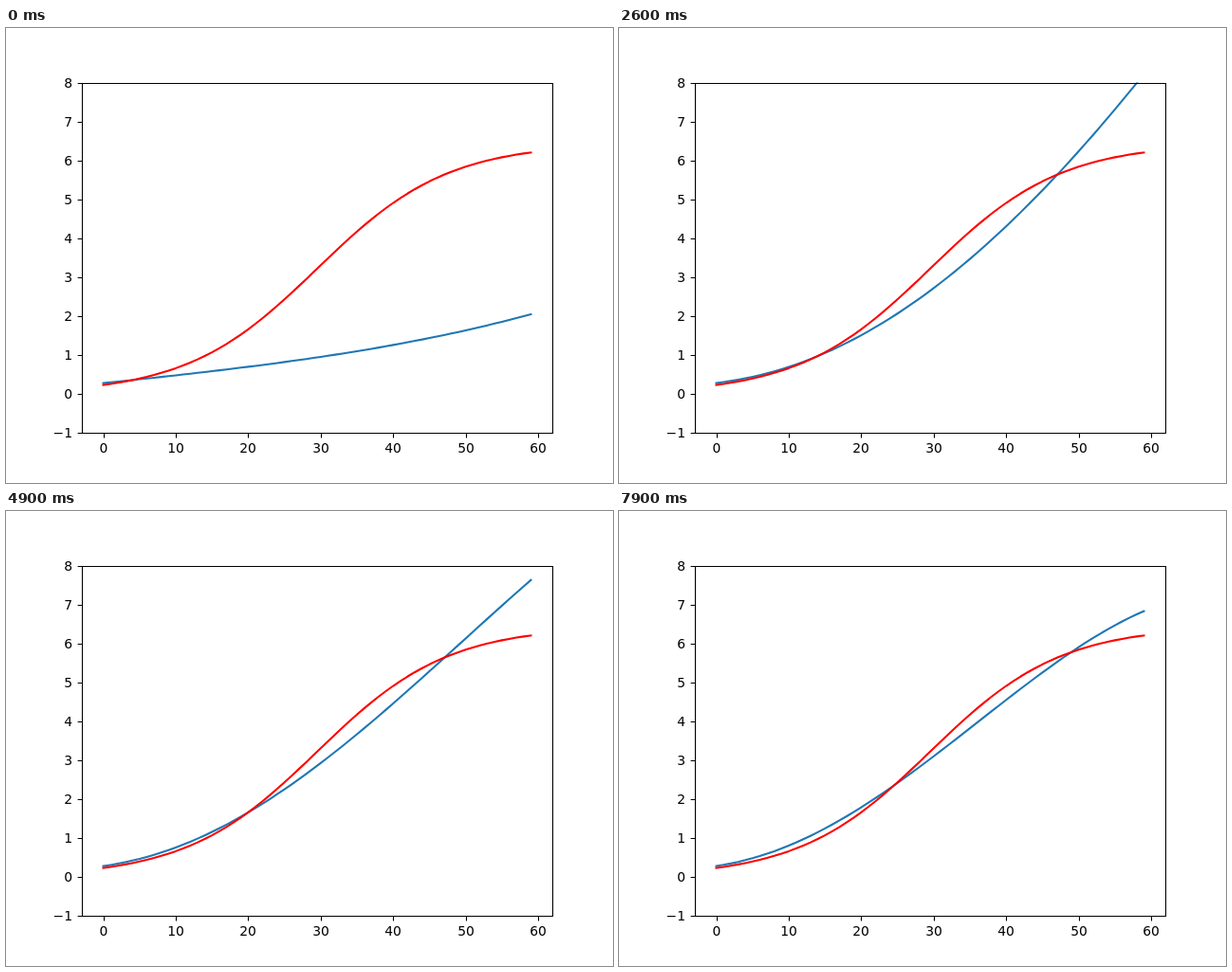
An HTML page for the animation above (8 s loop, 640 px wide and 480 px high).

```html
<!DOCTYPE html>
<html lang="en">
<head>
<meta charset="utf-8">
<title>Curve fitting</title>
<style>
  html, body { margin: 0; width: 100%; height: 100%; overflow: hidden; background: #fff; }
  svg { display: block; width: 640px; height: 480px; }
  text { font: 13.89px "DejaVu Sans", sans-serif; }
  .curve { fill: none; stroke-width: 2.08; stroke-linecap: square; stroke-linejoin: round; }
  .axes { fill: none; stroke: #000; stroke-width: 1.1; }
</style>
</head>
<body>
<svg viewBox="0 0 640 480">
  <clipPath id="plot"><rect x="80" y="57.6" width="496" height="369.6"/></clipPath>
  <g clip-path="url(#plot)">
    <path id="fit" class="curve" stroke="#1f77b4"/>
    <path id="goal" class="curve" stroke="#f00"/>
  </g>
  <path id="axes" class="axes"/>
  <g id="labels"></g>
</svg>
<script>
const LOOP = 8000, STEP = 100, LAST = 59, START = 0.28;

// The fit is steered by its heights at three handles.
const handles = [20, 40, LAST];
const poses = [
  { t: 0,   y: [0.70, 1.26, 2.05] },
  { t: 0.8, y: [1.17, 3.07, 5.85] },
  { t: 2.6, y: [1.51, 4.31, 8.22] },
  { t: 3.5, y: [1.45, 3.94, 7.17] },
  { t: 4.1, y: [1.51, 4.12, 7.34] },
  { t: 4.9, y: [1.66, 4.46, 7.63] },
  { t: 6.3, y: [1.67, 4.36, 6.92] },
  { t: 7.9, y: [1.79, 4.55, 6.83] }
];

const px = x => 80 + (x + 2.95) * 496 / 64.9;
const py = y => 427.2 - (y + 1) * 369.6 / 9;
const snap = v => Math.round(v) + 0.5;
const byId = id => document.getElementById(id);

// Smooth cubic through (xs, ys), with slopes taken from local parabolas.
function spline(xs, ys) {
  const n = xs.length - 1;
  const h = [], d = [], m = [];
  for (let i = 0; i < n; i++) {
    h[i] = xs[i + 1] - xs[i];
    d[i] = (ys[i + 1] - ys[i]) / h[i];
  }
  for (let i = 1; i < n; i++) {
    m[i] = (d[i - 1] * h[i] + d[i] * h[i - 1]) / (h[i - 1] + h[i]);
  }
  m[0] = 2 * d[0] - m[1];
  m[n] = 2 * d[n - 1] - m[n - 1];
  return x => {
    let i = 0;
    while (i < n - 1 && x > xs[i + 1]) i++;
    const u = (x - xs[i]) / h[i], v = 1 - u;
    return v * ys[i] + u * ys[i + 1]
      + u * v * h[i] * (v * (m[i] - d[i]) - u * (m[i + 1] - d[i]));
  };
}

// The mean slope from the start point bends as a parabola in warped x.
function fitCurve(heights) {
  const warp = x => x ** 1.15;
  const [a, b, c] = handles.map(warp);
  const [p, q, r] = heights.map((y, i) => (y - START) / handles[i]);
  const tilt = (q - p) / (b - a);
  const bend = ((r - q) / (c - b) - tilt) / (c - a);
  return x => {
    const w = warp(x);
    return START + x * (p + (w - a) * (tilt + (w - b) * bend));
  };
}

const goalCurve = x => 6.44 / (1 + Math.exp(-0.111 * (x - 29.5)));

function trace(id, f) {
  let path = "";
  for (let x = 0; x <= LAST; x++) {
    path += (x ? "L" : "M") + px(x).toFixed(2) + " " + py(f(x)).toFixed(2);
  }
  byId(id).setAttribute("d", path);
}

function label(value, x, y, anchor) {
  const el = document.createElementNS("http://www.w3.org/2000/svg", "text");
  el.textContent = String(value).replace("-", "\u2212");
  el.setAttribute("x", x);
  el.setAttribute("y", y);
  el.setAttribute("text-anchor", anchor);
  byId("labels").append(el);
}

function drawAxes() {
  let path = "M80.5 58.5H576.5V427.5H80.5Z";
  for (let x = 0; x <= 60; x += 10) {
    path += `M${snap(px(x))} 427.5v4.9`;
    label(x, Math.round(px(x)), 448, "middle");
  }
  for (let y = -1; y <= 8; y++) {
    path += `M80.5 ${snap(py(y))}h-4.9`;
    label(y, 70, Math.round(py(y) + 5.2), "end");
  }
  byId("axes").setAttribute("d", path);
}

const times = poses.map(p => p.t);
const tracks = handles.map((_, i) => spline(times, poses.map(p => p.y[i])));
const begin = performance.now();
let shown = -1;

function draw() {
  const step = Math.floor((performance.now() - begin) % LOOP / STEP);
  if (step !== shown) {
    shown = step;
    trace("fit", fitCurve(tracks.map(f => f(step * STEP / 1000))));
  }
  requestAnimationFrame(draw);
}

drawAxes();
trace("goal", goalCurve);
draw();
</script>
</body>
</html>
```
